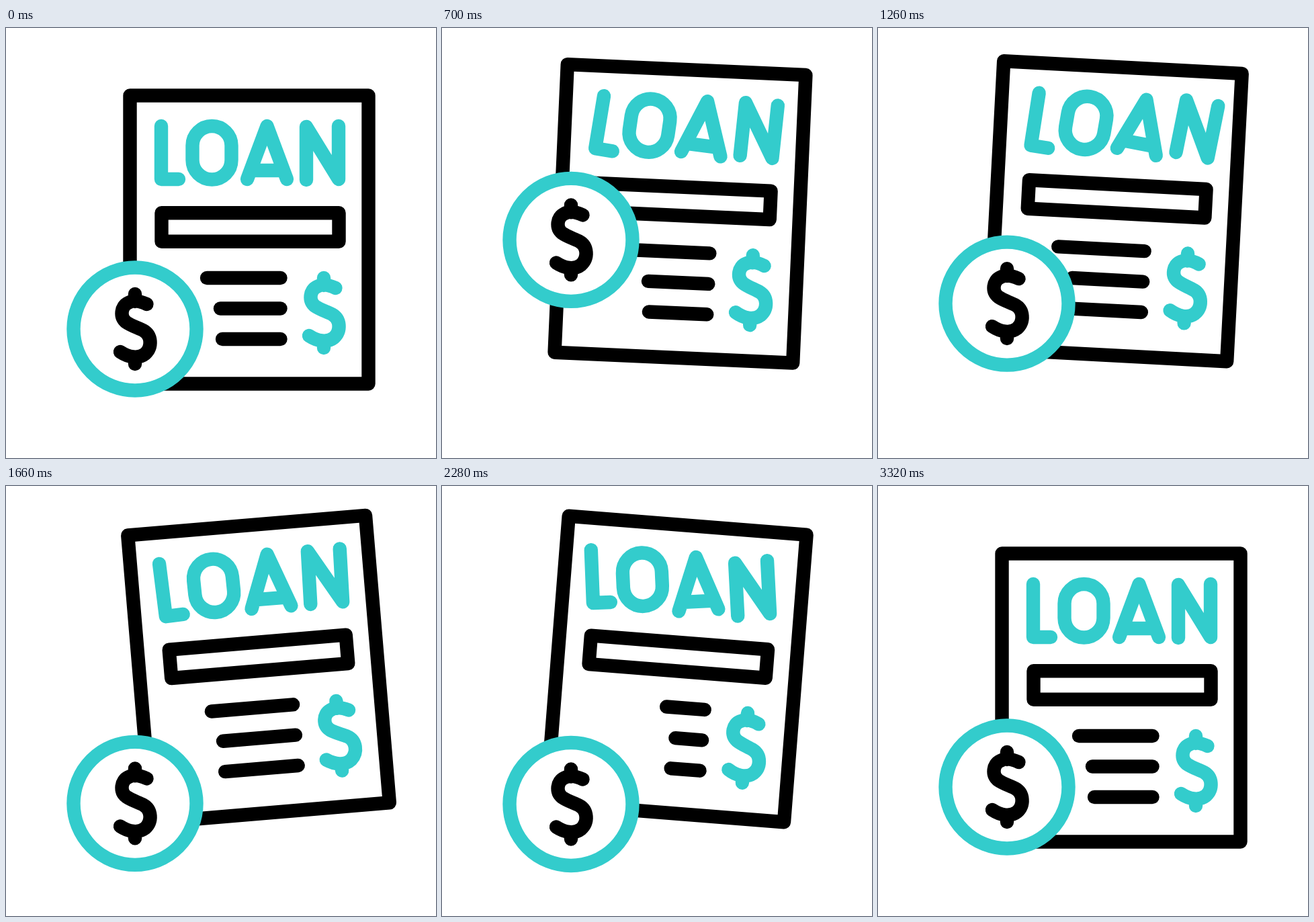
An HTML page with a canvas that plays this animation: 640 px wide and 640 px high, repeating every 3600 ms.

```html
<!DOCTYPE html>
<html lang="en">
<head>
<meta charset="utf-8">
<title>Loan</title>
<style>
  html, body { margin: 0; width: 100%; height: 100%; overflow: hidden; background: #fff; }
  canvas { display: block; width: 640px; height: 640px; }
</style>
</head>
<body>
<canvas id="stage" width="640" height="640"></canvas>
<script>
const ctx = document.getElementById('stage').getContext('2d');
const LOOP = 3600;
const TEAL = '#33cccc';
const BLACK = '#000';

// Keyframes are [time, value]; values ease in and out between neighbours.
const pageLift = [[200, 0], [810, -42], [2310, -42], [2950, 0]];
const pageTilt = [[430, 0], [1030, 6], [1700, -4.9], [2320, 4.6], [3030, 0]];
const letterTilt = [[200, 0], [940, 9], [2085, -7.5], [3080, 0]];
const lineGrowth = [[700, 0], [1460, 23], [2310, -53], [3010, 0]];
const coinY = [[200, 448], [670, 315], [1712, 473.5], [2880, 473.5], [3330, 448]];

const letters = [
  { pivot: 244, path: new Path2D('M231 146V225H257') },
  { pivot: 306.5, path: new Path2D('M277.5 175a29 29 0 0 1 58 0v21.5a29 29 0 0 1-58 0z') },
  { pivot: 388.5, path: new Path2D('M359 225L388.5 146L418 225M368 212H409') },
  { pivot: 471, path: new Path2D('M447 226V147L495 225V146') }
];
const lines = [
  { y: 372, left: 299 },
  { y: 417.5, left: 319 },
  { y: 463, left: 322 }
];
// Dollar sign centred on the origin.
const dollar = new Path2D(
  'M17.5-37C7-42-3-43-10-39C-21-34-23-18-13-10C-6-5 4-2 12 2' +
  'C25 9 26 27 15 37C5 45-10 42-22 34M0-52V-41M0 42V52');

function valueAt(keys, t) {
  if (t <= keys[0][0]) return keys[0][1];
  for (let i = 1; i < keys.length; i++) {
    const [t0, v0] = keys[i - 1];
    const [t1, v1] = keys[i];
    if (t < t1) {
      const u = (t - t0) / (t1 - t0);
      return v0 + (v1 - v0) * u * u * (3 - 2 * u);
    }
  }
  return keys[keys.length - 1][1];
}

function rotateAbout(x, y, degrees) {
  ctx.translate(x, y);
  ctx.rotate(degrees * Math.PI / 180);
  ctx.translate(-x, -y);
}

function stroke(path, color) {
  ctx.strokeStyle = color;
  ctx.stroke(path);
}

function drawDollar(x, y, color) {
  ctx.save();
  ctx.translate(x, y);
  stroke(dollar, color);
  ctx.restore();
}

function drawPage(t) {
  ctx.save();
  ctx.translate(0, valueAt(pageLift, t));
  rotateAbout(362, 147, valueAt(pageTilt, t));

  ctx.strokeStyle = BLACK;
  ctx.strokeRect(184.5, 100.5, 355, 429);
  ctx.strokeRect(231.5, 275.2, 264, 42.6);

  letters.forEach(({ pivot, path }, i) => {
    ctx.save();
    rotateAbout(pivot, 228, valueAt(letterTilt, t - i * 62));
    stroke(path, TEAL);
    ctx.restore();
  });

  ctx.strokeStyle = BLACK;
  lines.forEach(({ y, left }, i) => {
    ctx.beginPath();
    ctx.moveTo(left - valueAt(lineGrowth, t - i * 80), y);
    ctx.lineTo(408.5, y);
    ctx.stroke();
  });

  drawDollar(473, 424, TEAL);
  ctx.restore();
}

function drawCoin(t) {
  const y = valueAt(coinY, t);
  ctx.beginPath();
  ctx.arc(192, y, 91.5, 0, Math.PI * 2);
  ctx.fillStyle = '#fff';
  ctx.fill();
  ctx.strokeStyle = TEAL;
  ctx.stroke();
  drawDollar(192, y, BLACK);
}

function render(now) {
  const t = now % LOOP;
  ctx.fillStyle = '#fff';
  ctx.fillRect(0, 0, 640, 640);
  ctx.lineWidth = 20.4;
  ctx.lineCap = ctx.lineJoin = 'round';
  drawPage(t);
  drawCoin(t);
}

const start = performance.now();
function tick() {
  render(performance.now() - start);
  requestAnimationFrame(tick);
}
tick();
</script>
</body>
</html>
```
